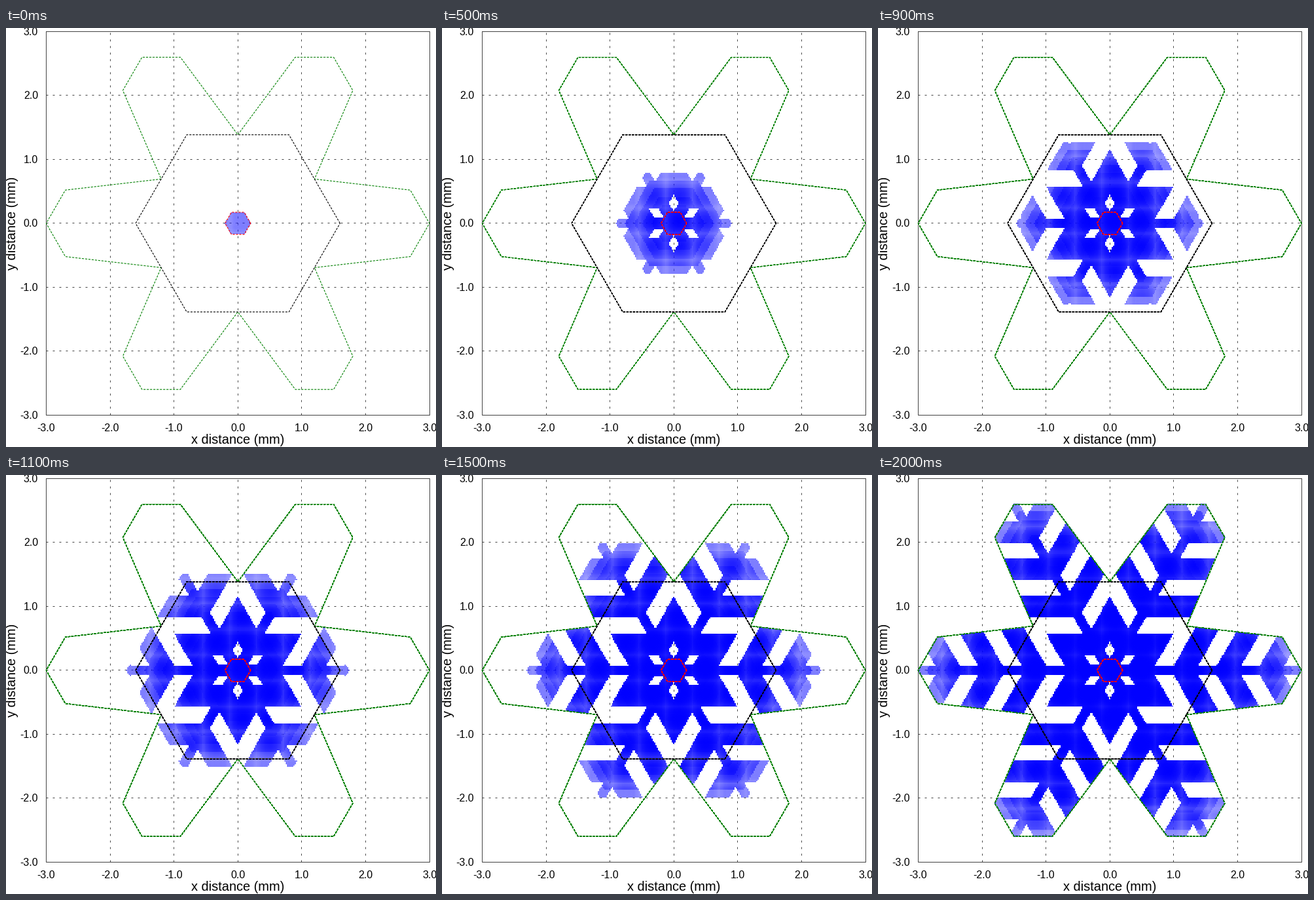
Animation, 657 px wide and 639 px high, one loop 2100 ms. Source, as a matplotlib script:

```python
import numpy as np
import matplotlib.pyplot as plt
from matplotlib.animation import FuncAnimation

W, H, DPI = 657, 639, 100
PX = 72 / DPI                      # one pixel in points
CX, CY, SX, SY = 354.2, 297.9, 97.6, 97.5
FRAMES = 21
R0, STEP = 0.2, 0.14               # seed radius and growth per frame, mm
PITCH = 0.02                       # spacing of the ice points, mm
DOT = 1.4                          # size of an ice point, pixels
ROOT3 = np.sqrt(3)

plt.rcParams.update({"font.family": "Liberation Sans", "lines.scale_dashes": False})


def to_px(x, y):
    return CX + SX * np.asarray(x), CY - SY * np.asarray(y)


def fold(x, y):
    """Map points into the half sector beside the arm on the x axis."""
    rho = np.hypot(x, y)
    ang = (np.arctan2(y, x) + np.pi / 6) % (np.pi / 3) - np.pi / 6
    return rho * np.cos(ang), np.abs(rho * np.sin(ang))


def is_ice(x, y):
    u = x - y / ROOT3              # constant along a side branch
    gap = (u < 0.258) & (y > 0.094)
    for k in range(4):
        start = 0.667 + 0.675 * k
        gap |= (u > start) & (u < start + 0.29) & (y > 0.075)
    inside = y <= 0.693 - 0.1155 * np.maximum(x - 1.2, 0)
    return inside & ~gap


def six_fold(points):
    pts = np.array(points)
    turns = np.radians(60 * np.arange(6))
    rot = [pts @ np.array([[np.cos(t), np.sin(t)], [-np.sin(t), np.cos(t)]]) for t in turns]
    pts = np.vstack(rot)
    return np.vstack([pts, pts[:1]])


def overlap(offset):
    """Share of a pixel covered by a dot at this offset along one axis."""
    return np.clip((DOT + 1) / 2 - np.abs(offset), 0, 1)


# Every pixel belongs to its nearest ice point.
px, py = np.meshgrid(np.arange(W) + 0.5, np.arange(H) + 0.5)
mx, my = (px - CX) / SX, (CY - py) / SY
gx, gy = np.round(mx / PITCH) * PITCH, np.round(my / PITCH) * PITCH
cover = overlap((mx - gx) * SX) * overlap((my - gy) * SY)
arm_x, arm_y = fold(gx, gy)
ice = is_ice(arm_x, arm_y)
birth = np.maximum(np.ceil((arm_x + arm_y / ROOT3 - R0 - 0.004) / STEP), 0)

fig = plt.figure(figsize=(W / DPI, H / DPI), dpi=DPI, facecolor="white")
ax = fig.add_axes([0, 0, 1, 1])
ax.axis("off")

rgba = np.zeros((H, W, 4))
rgba[..., 2] = 1
img = ax.imshow(rgba, extent=(0, W, H, 0), aspect="auto", interpolation="nearest", zorder=2)
ax.set_xlim(0, W)
ax.set_ylim(H, 0)

left, right, top, bottom = 61.5, 647.5, 5.5, 590.5
for v in range(-3, 4):
    x, y = np.floor(to_px(v, v)) + 0.5
    if abs(v) < 3:
        style = dict(color="#444444", lw=PX, ls=(0, (3 * PX, 7 * PX)), snap=False, zorder=1)
        ax.plot([x, x], [bottom, top], **style)
        ax.plot([left, right], [y, y], **style)
    label = f"{v:.1f}"
    ax.text(x, 615, label, size=16 * PX, ha="center", va="baseline")
    ax.text(49, y + 5.5, label, size=16 * PX, ha="right", va="baseline")
ax.plot([left, right, right, left, left], [top, top, bottom, bottom, top],
        color="#444444", lw=PX, snap=False, zorder=1)
ax.text(354, 634.5, "x distance (mm)", size=20 * PX, ha="center", va="baseline")
ax.text(15, 298, "y distance (mm)", size=20 * PX, ha="center", va="baseline",
        rotation=90, rotation_mode="anchor")

# The outlines are stroked again in every frame and so grow heavier.
arm = [(1.2, -0.693), (2.7, -0.52), (3, 0), (2.7, 0.52)]
strokes = []
for pts, color in ((arm, "#008000"), ([(1.6, 0)], "black"), ([(R0, 0)], "red")):
    xy = six_fold(pts)
    strokes.append([
        ax.plot(*to_px(xy[:, 0], xy[:, 1]), color=color, lw=1.1 * PX, snap=False,
                ls=(0, (3.2 * PX, 1.8 * PX)), dash_capstyle="butt", zorder=3)[0]
        for _ in range(FRAMES)])


def draw(k):
    age = np.maximum(k - birth + 1, 0)
    rgba[..., 3] = np.where(ice, 1 - (1 - cover) ** age, 0)
    img.set_data(rgba)
    for group in strokes:
        for i, line in enumerate(group):
            line.set_visible(i <= k)
    return [img, *sum(strokes, [])]


anim = FuncAnimation(fig, draw, frames=FRAMES, interval=100, repeat=True,
                     repeat_delay=0, blit=False)
plt.show()
```
